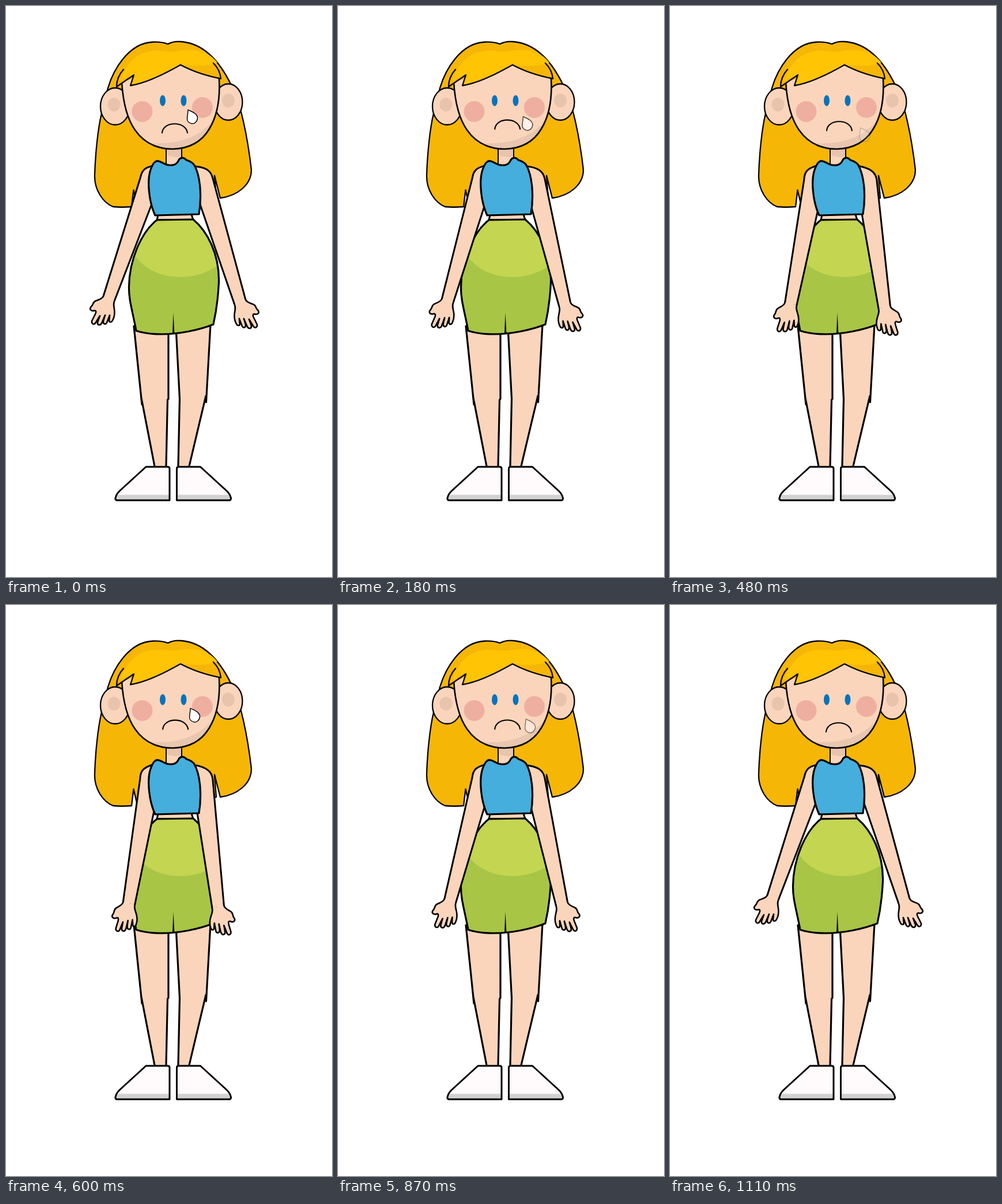
Animation, 566 px wide and 990 px high, one loop 1140 ms. Source, as an HTML page:

```html
<!DOCTYPE html>
<html lang="en">
<head>
<meta charset="utf-8">
<title>Sad girl</title>
<style>
  html, body { margin: 0; width: 100%; height: 100%; overflow: hidden; background: #fff; }
  svg { display: block; width: 100vw; height: 100vh; }
  .ink { stroke: #000; stroke-linejoin: round; stroke-linecap: round; }
  .line { fill: none; }
  .skin { fill: #fad5bb; }
  .hair { fill: #f6b606; }
  .thin { stroke-width: 2.3; }
  .bold { stroke-width: 3; }
</style>
</head>
<body>
<svg viewBox="0 0 566 990">
  <defs>
    <path id="hand" class="ink skin" stroke-width="2.6" d="M169 503C167 508 161 509 156 511C150 513 152 518 148 521
      C144 525 147 530 154 528C156 528 157 530 155 534L149 546C148 551 152 553 155 550L163 537L159 548
      C158 553 163 555 166 550L172 536L169 546C168 552 173 553 175 549L180 536L179 545
      C179 549 183 549 185 545C189 538 189 533 188 526C187 519 186 516 188.500 510.500"/>
    <g id="shoe">
      <path fill="#fffbfd" d="M243 799H284V857H190C190 850 193 845 197 841Z"/>
      <path fill="#d2d1d2" d="M193 847.5H284V857H190Z"/>
      <path class="ink line bold" d="M243 799H281Q284 799 284 802V857H193Q189.500 857 190 853C191 848 193 845 197 841Z"/>
    </g>
  </defs>

  <!-- hair behind -->
  <path class="ink hair thin" d="M177 142C186 112 212 64 255 62.500C268 62 276 64 281 66C288 62 297 61 306 62
    C346 66 373 100 391 137L408 183C416 214 423 258 426 284C426 310 402 329 372 333L362 294L365 333L360 335
    L228 347L221.500 319L218 348C206 349 196 349 186 348C168 341 153 318 154 293C155 260 159 215 166 186Z"/>

  <!-- ears -->
  <g class="ink skin thin">
    <ellipse cx="189.500" cy="174" rx="25.500" ry="32"/>
    <ellipse cx="386" cy="166.500" rx="24.500" ry="31.500"/>
  </g>
  <g fill="#e9c4ad">
    <ellipse cx="187.500" cy="171" rx="11" ry="12"/>
    <ellipse cx="386" cy="164" rx="11" ry="12"/>
  </g>

  <!-- legs -->
  <g class="ink skin" stroke-width="3.200">
    <path stroke="none" d="M222 555L235 680L258 799H278L282 681V560ZM355 553L348 680L318 799H299L301 681L295 560Z"/>
    <path class="line" d="M222 555L236 691L234.500 677L258 798M282 566V681L280.500 683L278 798
      M355 553L347.500 687L347 676L318 798M295.500 566L301.500 681L299 798"/>
  </g>
  <use href="#shoe"/>
  <use href="#shoe" transform="translate(580.500 0) scale(-1 1)"/>

  <!-- waist and skirt -->
  <path class="ink skin bold" d="M265 358L262 371H325L321 358"/>
  <path fill="#a8c546" d="M262 371L325 370C349 390 371 430 369.500 480C368 510 365 530 360 552
    C335 562 300 569 270 569C250 569 235 566 226 563C220 530 213 510 213.500 487C214 440 235 392 262 371Z"/>
  <path fill="#c3d551" d="M262 371L325 370C345 387 362 415 367 450C325 481 252 477 222 430C230 405 245 385 262 371Z"/>
  <path class="ink line" stroke-width="3.200" d="M262 371L325 370C349 390 371 430 369.500 480C368 510 365 530 360 552
    C335 562 300 569 270 569C250 569 235 566 226 563C220 530 213 510 213.500 487C214 440 235 392 262 371Z"/>
  <path d="M290.500 532L289 569H292.500Z"/>

  <!-- arms -->
  <g id="armL">
    <path class="ink skin bold" d="M169 503L233.500 297C236 284 242 279 259 276.500V328L252 346L188.500 510.500"/>
    <use href="#hand"/>
  </g>
  <g id="armR">
    <path class="ink skin bold" d="M416 509L358.500 297C355 285 346 278 322 278L333 330L337 344L396.500 516.500"/>
    <use href="#hand" transform="translate(585 6) scale(-1 1)"/>
  </g>

  <!-- neck and top -->
  <path class="skin" d="M278 245H305V280H278Z"/>
  <path fill="#e9c4ad" d="M278 245H305V261Q290 264 278 258Z"/>
  <path class="ink line" stroke-width="2" d="M278 245V276M305 245V270"/>
  <path class="ink" fill="#45aedc" stroke-width="3.200" d="M265 269C271 270 275 276 284 276C294 277 298 272 300 267
    C304 261 310 263 313 267C319 269 324 271 327 276C336 292 341 325 335 361L259 363
    C249 342 244 305 251 284C254 275 259 267 265 269Z"/>

  <!-- face -->
  <path id="faceFill" class="skin"/>
  <path fill="#e8c6b0" d="M242 236C285 243 335 232 361 196C352 225 328 247 290 248C270 248 254 244 242 236Z"/>
  <path id="faceLine" class="ink line" stroke-width="2.600"/>
  <g fill="#efafa0">
    <circle cx="236.500" cy="183" r="18"/>
    <circle cx="341" cy="176" r="18"/>
  </g>
  <g fill="#0873bb">
    <ellipse cx="272" cy="164" rx="5" ry="9.500"/>
    <ellipse cx="308.500" cy="164" rx="5" ry="9.500"/>
  </g>
  <path id="mouth" class="ink line" stroke-width="2.100" d="M271 220C273 199 312 199 315 220"/>
  <path id="tear" class="ink" fill="#fff" stroke-width="1.500" d="M0 0C6 3 16 6 16.500 14C16 21 11 24 7 24C1 23-2 19-1.500 14C-1 9 0 4 0 0Z"/>

  <!-- fringe -->
  <path class="hair" d="M205 109C194 120 192 133 192 140L222 119L216 138C250 132 285 112 303 102
    C325 114 348 121 373 126C372 114 366 104 359 98L300 85Z"/>
  <path fill="#ffc403" d="M198 130C206 108 220 83 252 78C272 76 285 81 300 78C328 73 352 79 367 98
    C350 105 325 105 303 102C285 112 250 132 216 138L222 119Z"/>
  <path class="ink line thin" d="M204 110C194 121 192 133 192 140L222 119.500L216 138C250 132 285 112 303 102
    C325 114 348 121 373 126C372 114 367 106 360 99"/>
</svg>
<script>
  const LOOP = 1140, TURN = 570, END = 1110;
  const el = id => document.getElementById(id);
  const move = (id, value) => el(id).setAttribute('transform', value);

  const face = 'M201 132C203 165 210 195 224 215C240 238 262 248 290 248C320 247 340 235 353 213C367 190 372 160 370 126';
  el('faceLine').setAttribute('d', face);
  el('faceFill').setAttribute('d', face + 'L303 100Z');

  // Linear interpolation through [time, value] pairs
  function track(keys, t) {
    const i = keys.findIndex(k => k[0] >= t);
    if (i < 0) return keys[keys.length - 1][1];
    if (i === 0) return keys[0][1];
    const [t0, a] = keys[i - 1], [t1, b] = keys[i];
    return a + (b - a) * (t - t0) / (t1 - t0);
  }

  const swing = [[0, 0], [TURN, 1], [END, 0]];
  const pout = [[0, 0], [150, -7], [400, -4], [TURN, -4], [735, -7.5], [END, 0]];

  function draw(t) {
    const s = track(swing, t);
    move('armL', `rotate(${-10.1 * s} 258 303)`);
    move('armR', `rotate(${10.7 * s} 329 302)`);

    const y = track(pout, t);
    move('mouth', `translate(${Math.min(1.2, -y * 0.25)} ${y})`);

    const second = t >= TURN;
    const age = second ? t - TURN : t;
    const life = second ? END - TURN : TURN;
    const [x0, y0, vx, vy] = second ? [319.4, 177, 0.0225, 0.069] : [316, 180, 0.03, 0.065];
    move('tear', `translate(${x0 + vx * age} ${y0 + vy * age})`);
    el('tear').setAttribute('opacity', Math.max(0, 1 - age / life));
  }

  const start = performance.now();
  function tick(now) {
    draw(Math.max(0, now - start) % LOOP);
    requestAnimationFrame(tick);
  }
  draw(0);
  requestAnimationFrame(tick);
</script>
</body>
</html>
```
